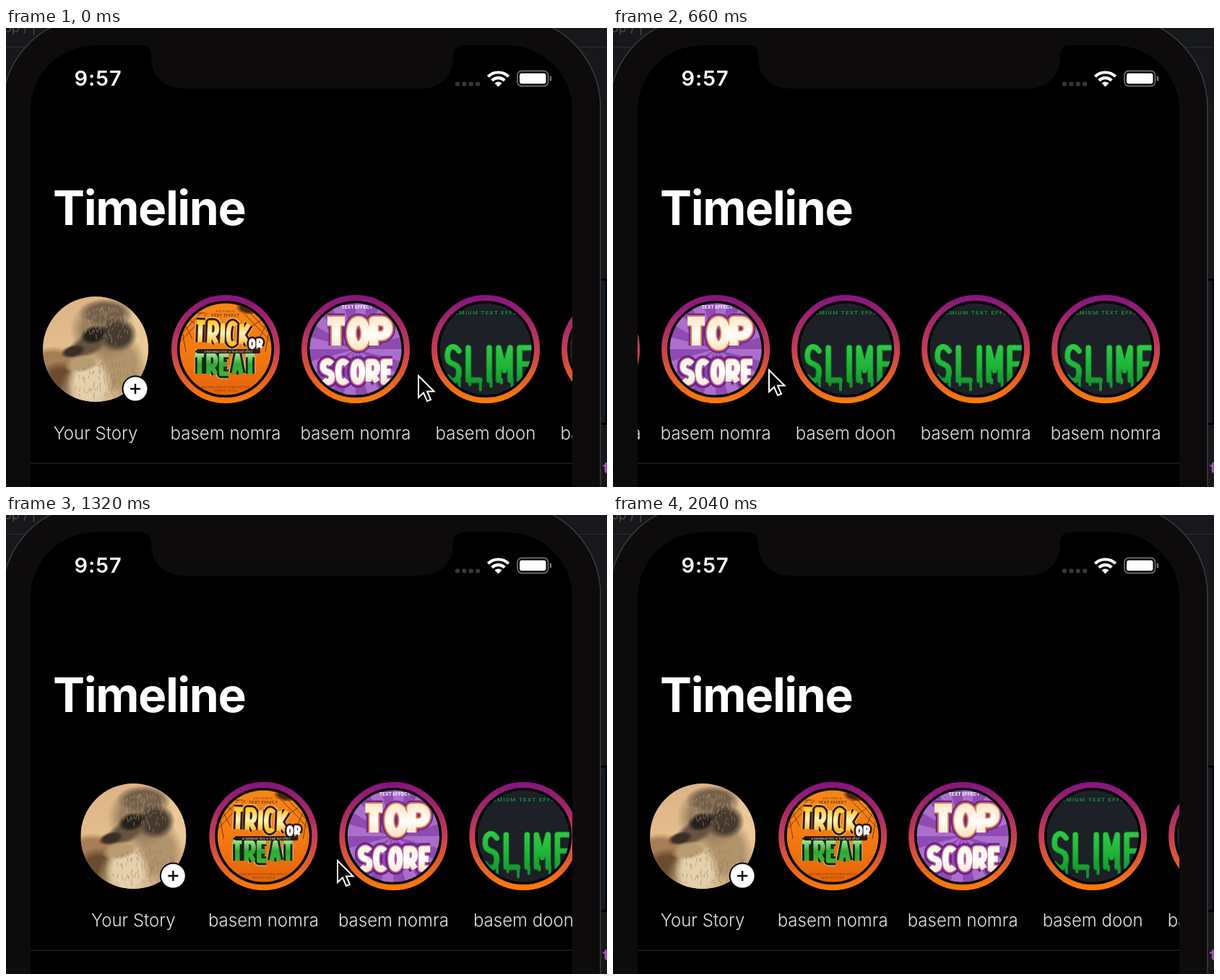
An HTML page with a canvas that plays this animation: 832 by 636 pixels, repeating every 2.1 s.

```html
<!DOCTYPE html>
<html lang="en">
<head>
<meta charset="utf-8">
<title>Timeline</title>
<style>
html, body { margin: 0; width: 100%; height: 100%; overflow: hidden; background: #0d0b0c; }
canvas { display: block; width: 832px; height: 636px; }
</style>
</head>
<body>
<canvas id="stage" width="832" height="636"></canvas>
<script>
const ctx = document.getElementById('stage').getContext('2d');
const LOOP = 2100, STEP = 60, END = 331, PITCH = 180, MID = 445;
const SANS = 'Inter, "Liberation Sans", sans-serif';

// Lettering strokes on a 10 x 10 grid
const GLYPHS = {
  T: 'M-1 0H11M5 0V10',
  O: 'M5 0C-1.7 0 -1.7 10 5 10S11.7 0 5 0Z',
  P: 'M0 10V0H5C11.5 0 11.5 6 5 6H0',
  R: 'M0 10V0H5C11.5 0 11.5 6 5 6H0M4 6L10 10',
  S: 'M10 1C5 -1.5 0 0 0 2.5C0 6 10 4 10 7.5C10 10.5 4 11 0 9',
  C: 'M10 1C5 -1.5 0 0 0 5S5 11.5 10 9',
  E: 'M10 0H0V10H10M0 5H8',
  I: 'M0 0V10',
  K: 'M0 0V10M10 0L1 5.5L10 10',
  A: 'M0 10L5 0L10 10M2 7H8',
  L: 'M0 0V10H10',
  M: 'M0 10V0L5 7L10 0V10'
};

function text(s, x, y, font, color, align = 'left', spacing = 0) {
  ctx.font = font;
  ctx.fillStyle = color;
  ctx.textAlign = align;
  ctx.letterSpacing = spacing + 'px';
  ctx.fillText(s, x, y);
}

function disc(x, y, r, fill) {
  ctx.beginPath();
  ctx.arc(x, y, r, 0, Math.PI * 2);
  ctx.fillStyle = fill;
  ctx.fill();
}

function box(x, y, w, h, r, fill) {
  ctx.beginPath();
  ctx.roundRect(x, y, w, h, r);
  ctx.fillStyle = fill;
  ctx.fill();
}

function fade(y0, y1, ...colors) {
  const g = ctx.createLinearGradient(0, y0, 0, y1);
  colors.forEach((c, i) => g.addColorStop(i / (colors.length - 1), c));
  return g;
}

// Soft-edged ellipse
function blob(x, y, rx, ry, color, turn = 0) {
  ctx.save();
  ctx.translate(x, y);
  ctx.rotate(turn);
  ctx.scale(rx, ry);
  const g = ctx.createRadialGradient(0, 0, 0, 0, 0, 1);
  g.addColorStop(0, color);
  g.addColorStop(0.6, color);
  g.addColorStop(1, color + '00');
  disc(0, 0, 1, g);
  ctx.restore();
}

function word(s, x, y, w, h, gap) {
  const path = new Path2D();
  for (const c of s) {
    path.addPath(new Path2D(GLYPHS[c]), new DOMMatrix([w / 10, 0, 0, h / 10, x, y]));
    x += (c === 'I' ? 0 : w) + gap;
  }
  return path;
}

// layers: [colour, width] pairs from back to front
function ink(path, ...layers) {
  ctx.lineJoin = 'round';
  for (const [color, width] of layers) {
    ctx.strokeStyle = color;
    ctx.lineWidth = width;
    ctx.stroke(path);
  }
}

const trick = word('TRICK', -41, -36, 10, 28, 8);
const or = word('OR', 34, -13, 5.5, 11, 5);
const treat = word('TREAT', -41, 8, 10, 26, 7.5);
const topWord = word('TOP', -37, -39, 20, 34, 11);
const score = word('SCORE', -45, 18, 12, 27, 9);
const slime = word('SLIME', -53, -2, 16, 45, 13);

// Short downward hairs scattered over an ellipse
function fur(x, y, rx, ry, color, count) {
  let seed = 7;
  const rand = () => (seed = seed * 16807 % 2147483647) / 2147483647;
  ctx.beginPath();
  for (let i = 0; i < count; i++) {
    const a = rand() * Math.PI * 2, r = Math.sqrt(rand());
    const hx = x + rx * r * Math.cos(a), hy = y + ry * r * Math.sin(a);
    ctx.moveTo(hx, hy);
    ctx.lineTo(hx + rand() * 4 - 2, hy + 3 + rand() * 4);
  }
  ctx.strokeStyle = color;
  ctx.lineWidth = 1.2;
  ctx.stroke();
}

function photo() {
  ctx.fillStyle = fade(-73, 73, '#dcb487', '#e4bd8d', '#c0966a');
  ctx.fillRect(-73, -73, 146, 146);
  blob(-58, 18, 36, 22, '#a67d55');
  blob(-48, 46, 34, 30, '#6b4c31');
  blob(56, -20, 30, 55, '#eac898');
  blob(14, 62, 66, 58, '#d3b98f');
  blob(34, 22, 36, 46, '#b2946c');
  blob(10, -26, 46, 44, '#9a7f5e');
  blob(14, -50, 38, 20, '#74604a');
  blob(30, -20, 28, 24, '#463a2f');
  blob(-10, -6, 34, 16, '#665340', -0.5);
  blob(-31, 3, 18, 9, '#3a2d22', -0.25);
  blob(-2, -20, 20, 13, '#26201c', -0.3);
  blob(-8, 46, 32, 38, '#e4d0ac');
  blob(-18, 20, 26, 12, '#b99c72', -0.2);
  fur(14, -34, 36, 26, '#c9ad8466', 90);
  fur(16, 46, 50, 30, '#8f724c66', 110);
}

function halloween() {
  ctx.fillStyle = fade(-64, 64, '#f58718', '#f57a10', '#e4640a');
  ctx.fillRect(-64, -64, 128, 128);
  ctx.strokeStyle = '#7c3508';
  ctx.lineWidth = 1;
  for (const side of [-1, 1]) {
    ctx.beginPath();
    for (let i = 0; i < 4; i++) {
      ctx.moveTo(side * 64, -50);
      ctx.lineTo(side * (28 + i * 9), -50 + i * 18);
      const d = 12 + i * 9;
      ctx.moveTo(side * (64 - d), -50);
      ctx.quadraticCurveTo(side * (64 - d * 0.5), -50 + d * 0.5, side * 62, -50 + d);
    }
    ctx.stroke();
  }
  blob(32, -58, 18, 10, '#4b210c');
  text('EDITABLE', 0, -51, '4px ' + SANS, '#713108', 'center', 1);
  text('TEXT EFFECT', 0, -45, '700 5px ' + SANS, '#713108', 'center', 0.6);
  ink(treat, ['#e3c79a', 14.5], ['#14280f', 12.5], [fade(4, 38, '#b5efa0', '#2fa834', '#3fb838'), 6.5]);
  ctx.save();
  ctx.rotate(0.04);
  ink(trick, ['#efd29a', 14.5], ['#3a1a08', 12.5], [fade(-39, -5, '#ffc21c', '#fff3bd', '#f6b51c'), 6.5]);
  ctx.restore();
  ink(or, ['#2a1408', 9], ['#fff', 4]);
  box(-40, 0, 88, 6, 2, '#241a12');
  text('a halloween trick or treat text effect', 4, 4.6, '4px ' + SANS, '#f2eadb', 'center');
  text('EDITABLE AND SCALABLE EFFECT', 0, 54, '4px ' + SANS, '#8c3c05', 'center');
  text('GRAPHIC STYLE', 0, 59, '4px ' + SANS, '#8c3c05', 'center');
}

function arcade() {
  ctx.fillStyle = '#8f4bb2';
  ctx.fillRect(-64, -64, 128, 128);
  ctx.fillStyle = '#ab6fcb';
  for (let i = 0; i < 12; i++) {
    const a = i * Math.PI / 6;
    ctx.beginPath();
    ctx.moveTo(0, 0);
    ctx.arc(0, 0, 90, a, a + Math.PI / 12);
    ctx.fill();
  }
  text('TEXT EFFECT', 2, -56, '700 6.5px ' + SANS, '#fff', 'center');
  ink(topWord, ['#6f2888', 21], ['#dc7f58', 16], [fade(-45, 4, '#ffe8c9', '#fffdf8', '#ffdfb8'), 12]);
  ink(score, ['#65207f', 17], ['#b8559a', 12], [fade(13, 50, '#fff4dc', '#fff', '#ffe6cf'), 8.5]);
}

function goo() {
  ctx.fillStyle = '#1d2027';
  ctx.fillRect(-64, -64, 128, 128);
  text('PREMIUM TEXT EFFECT', 1, -48, '500 8px Roboto, sans-serif', '#159a3d', 'center', 1.3);
  const green = fade(-8, 58, '#32cc43', '#1fb239', '#13892b');
  ctx.lineCap = 'round';
  ink(slime, ['#0b4d20', 9.5], [green, 7.2]);
  ctx.beginPath();
  for (let i = 0; i < 8; i++) {
    const x = -51 + i * 14.6;
    ctx.moveTo(x, 42);
    ctx.lineTo(x, 47 + (i * 3 % 5) * 2.4);
  }
  ctx.strokeStyle = green;
  ctx.lineWidth = 4;
  ctx.stroke();
  ctx.lineCap = 'butt';
}

const STORIES = [
  ['Your Story', photo],
  ['basem nomra', halloween],
  ['basem nomra', arcade],
  ['basem doon', goo],
  ['basem nomra', goo],
  ['basem nomra', goo]
];

function story([name, art], x, own) {
  ctx.save();
  ctx.translate(x, MID);
  if (!own) {
    ctx.beginPath();
    ctx.arc(0, 0, 71, 0, Math.PI * 2);
    ctx.strokeStyle = fade(-75, 75, '#85147f', '#c33d55', '#ff7d05');
    ctx.lineWidth = 8;
    ctx.stroke();
  }
  ctx.save();
  ctx.beginPath();
  ctx.arc(0, 0, own ? 73 : 63.5, 0, Math.PI * 2);
  ctx.clip();
  art();
  ctx.restore();
  if (own) {
    disc(55, 55, 18.5, '#000');
    disc(55, 55, 16.5, '#fff');
    ctx.fillStyle = '#000';
    ctx.fillRect(48, 53.8, 14, 2.4);
    ctx.fillRect(53.8, 48, 2.4, 14);
  }
  ctx.restore();
  text(name, x, 570, '300 24px ' + SANS, '#e6e3df', 'center');
}

function desktop() {
  ctx.fillStyle = '#17181c';
  ctx.fillRect(0, 0, 832, 636);
  ctx.fillStyle = '#2c2d31';
  ctx.fillRect(0, 26, 832, 1);
  text('op / |', -3, 6, '18px ' + SANS, '#4c4b4c');
  text('t', 825, 617, '700 21px "Noto Sans Mono", monospace', '#a94fc4');
}

function phone() {
  box(819, 347, 13, 203, 2, '#000');
  box(821, 350, 9, 197, 1, '#161a23');
  box(-5, -15, 828, 800, 125, '#0d0b0c');
  ctx.strokeStyle = '#3b3a3c';
  ctx.lineWidth = 1.5;
  ctx.stroke();
  ctx.fillStyle = '#000';
  ctx.fill(new Path2D('M34 640V114A90 90 0 0 1 124 24H187Q201 24 201 40' +
    'C201 70 222 84 247 84H573C598 84 619 70 619 40Q619 24 633 24' +
    'H694A90 90 0 0 1 784 114V640Z'));
}

function status() {
  text('9:57', 94.5, 80, '600 29px ' + SANS, '#fff', 'left', 1);
  for (let i = 0; i < 4; i++) box(622 + i * 9.4, 74.5, 6, 6, 2, '#373638');
  ctx.save();
  ctx.beginPath();
  ctx.moveTo(681.5, 81.5);
  ctx.arc(681.5, 81.5, 23, -Math.PI * 0.75, -Math.PI * 0.25);
  ctx.clip();
  disc(681.5, 81.5, 7, '#fff');
  ctx.strokeStyle = '#fff';
  ctx.lineWidth = 4.2;
  for (const r of [12.4, 20]) {
    ctx.beginPath();
    ctx.arc(681.5, 81.5, r, 0, Math.PI * 2);
    ctx.stroke();
  }
  ctx.restore();
  box(708, 59.5, 42.5, 21, 6, '#000');
  ctx.strokeStyle = '#6d6660';
  ctx.lineWidth = 1.8;
  ctx.stroke();
  box(711, 62.8, 36.5, 14.4, 3, '#fff');
  box(752.8, 66.5, 2.4, 7, 1.2, '#77716c');
}

function pointer(x, y) {
  const p = new Path2D('M0 0V30L7 23.5L12 35L17 33L12 21.5H21.5Z');
  ctx.save();
  ctx.translate(x, y);
  ctx.fillStyle = '#000';
  ctx.fill(p);
  ctx.lineJoin = 'miter';
  ctx.strokeStyle = '#fff';
  ctx.lineWidth = 2;
  ctx.stroke(p);
  ctx.restore();
}

// Linear walk through [time, ...values] rows
function walk(rows, t) {
  const i = rows.findIndex(r => r[0] > t);
  if (i < 0) return rows[rows.length - 1].slice(1);
  const a = rows[i - 1], b = rows[i], k = (t - a[0]) / (b[0] - a[0]);
  return a.slice(1).map((v, j) => v + (b[j + 1] - v) * k);
}

// Critically damped return from an overscroll
function settle(ms) {
  const k = 0.0109 * ms;
  return (1 + k) * Math.exp(-k);
}

const MOUSE = [
  [0, 571, 482], [60, 548, 482], [120, 520, 481], [180, 486, 481], [240, 442, 481],
  [300, 389, 480], [360, 285, 477], [420, 232, 475], [480, 216, 474], [1020, 216, 474],
  [1080, 240, 475], [1140, 310, 476], [1200, 410, 478], [1272, 459, 479],
  [1680, 459, 479], [1980, 490, 640]
];
const FLING = [[300, 151], [360, 245], [420, 327], [480, END + 26]];
const RETURN = [[1020, END], [1080, 296], [1140, 205], [1200, 70], [1272, -58]];

function scrollAt(t, mouseX) {
  if (t < 300) return Math.max(0, 571 - 31 - mouseX);
  if (t < 480) return walk(FLING, t)[0];
  if (t < 1020) return END + 26 * settle(t - 480);
  if (t < 1272) return walk(RETURN, t)[0];
  return -58 * settle(t - 1272);
}

function draw(t) {
  const [mx, my] = walk(MOUSE, t);
  const scroll = scrollAt(t, mx);
  desktop();
  phone();
  status();
  text('Timeline', 65, 273, '700 66px ' + SANS, '#fff', 'left', -1.4);
  ctx.fillStyle = '#1f1f20';
  ctx.fillRect(34, 602.5, 750, 1.5);
  ctx.save();
  ctx.beginPath();
  ctx.rect(34, 340, 750, 260);
  ctx.clip();
  STORIES.forEach((s, i) => {
    const x = 124 + i * PITCH - scroll;
    if (x > -60 && x < 880) story(s, x, i === 0);
  });
  ctx.restore();
  pointer(mx, my);
}

const start = performance.now();
function tick(now) {
  const t = Math.max(0, now - start) % LOOP;
  draw(Math.floor(t / STEP) * STEP);
  requestAnimationFrame(tick);
}
draw(0);
requestAnimationFrame(tick);
</script>
</body>
</html>
```
